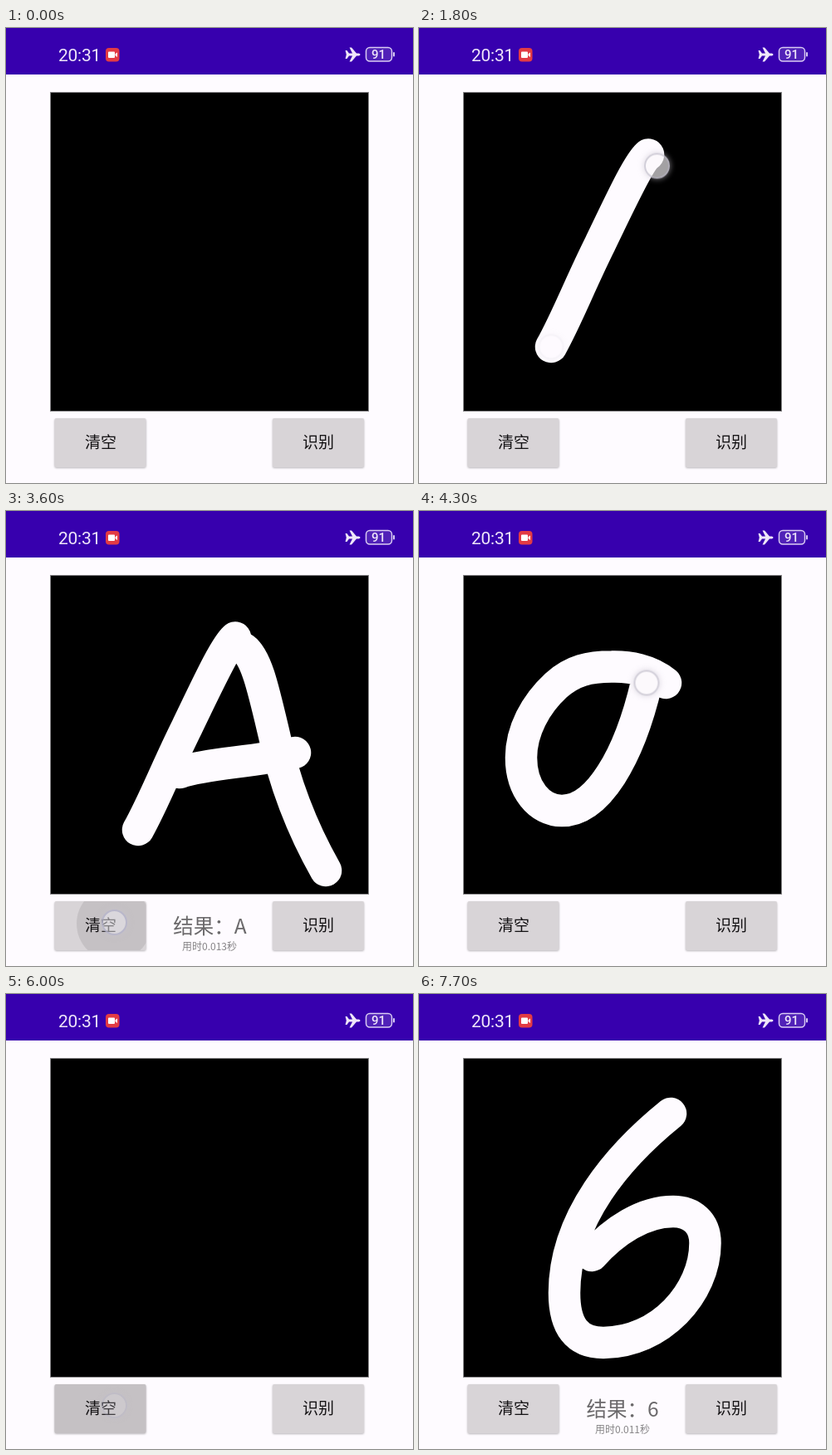
An HTML page that plays this animation: 490 px wide and 548 px high, repeating every 8000 ms.

```html
<!DOCTYPE html>
<html lang="zh">
<head>
<meta charset="utf-8">
<title>手写识别</title>
<style>
html, body { margin: 0; width: 100%; height: 100%; overflow: hidden; background: #fefbff; }
svg { position: absolute; left: 0; top: 0; }
text { font-family: "Noto Sans CJK SC", "Noto Sans CJK", "Noto Sans CJK JP", sans-serif; text-anchor: middle; }
.status { font-family: Roboto, sans-serif; fill: #efe6f9; }

/* everything advances in 100 ms ticks: 1.25% of the loop */
.ink, .pen, .tap, .ripple, .result { animation: var(--k) 8s step-end infinite; opacity: 0; }

/* pen paths, shared by the ink and the touch marker */
.p1 { --p: path("M276 152.5C265 160.5 242 210 218 260C194 308 178 350 159 384"); }
.p2 { --p: path("M286.5 166C301.5 177 309.5 213 322.5 268C334.5 325 355 380 385 433"); }
.p3 { --p: path("M209 315C240 304 295 303 348 291"); }
.p4 { --p: path("M297 207C278 191 252 187 232 187.5C205 187.5 185 192 165 210C140 233 123 265 123 297C123 335 145 361 172 361C215 361 253 297 274 207"); }
.p5 { --p: path("M270 208C262 245 260 280 259.500 315C259.500 355 266 374.500 287 374.500C308 374.500 335 358 364 343"); }
.p6 { --p: path("M303 144C240 195 175 270 175 360C175 400 190 420 222 420C290 420 344.500 360 344.500 300C344.500 275 328 262 306 262C270 262 235 285 208 315"); }

.ink {
  d: var(--p); fill: none; stroke: #fefbff; stroke-width: 38.5;
  stroke-linecap: round; stroke-linejoin: round;
  stroke-dasharray: 100 200; stroke-dashoffset: 100;
}
.pen, .tap {
  position: absolute; left: 0; top: 0; width: 31px; height: 31px;
  box-sizing: border-box; border-radius: 50%;
  background: rgba(250, 247, 251, .65);
  border: 2px solid rgba(182, 179, 194, .62);
  box-shadow: 0 0 6px 1px rgba(200, 196, 206, .5);
}
.pen { offset-path: var(--p); offset-rotate: 0deg; }
.tap { background: rgba(240, 238, 244, .5); border-color: rgba(170, 170, 196, .7); }
.ripple { fill: #000; fill-opacity: .085; transform-box: fill-box; transform-origin: center; }
.btn { fill: #d8d4d7; filter: drop-shadow(0 1px 1.2px rgba(0, 0, 0, .28)); }

@keyframes ink1 {
  6.25% { opacity: 1; stroke-dashoffset: 100; animation-timing-function: steps(6); }
  13.75% { opacity: 1; stroke-dashoffset: 0; }
  46.25% { opacity: 0; }
}
@keyframes ink2 {
  22.5% { opacity: 1; stroke-dashoffset: 100; animation-timing-function: steps(4); }
  27.5% { opacity: 1; stroke-dashoffset: 0; }
  46.25% { opacity: 0; }
}
@keyframes ink3 {
  28.75% { opacity: 1; stroke-dashoffset: 100; animation-timing-function: steps(2); }
  31.25% { opacity: 1; stroke-dashoffset: 0; }
  46.25% { opacity: 0; }
}
@keyframes ink4 {
  47.5% { opacity: 1; stroke-dashoffset: 100; animation-timing-function: steps(5); }
  53.75% { opacity: 1; stroke-dashoffset: 0; }
  75% { opacity: 0; }
}
@keyframes ink5 {
  55% { opacity: 1; stroke-dashoffset: 100; animation-timing-function: steps(3); }
  58.75% { opacity: 1; stroke-dashoffset: 0; }
  75% { opacity: 0; }
}
@keyframes ink6 {
  76.25% { opacity: 1; stroke-dashoffset: 100; animation-timing-function: steps(5); }
  82.5% { opacity: 1; stroke-dashoffset: 48.5; animation-timing-function: steps(5); }
  88.75% { opacity: 1; stroke-dashoffset: 0; }
}

@keyframes pen1 {
  6.25% { opacity: 1; offset-distance: 0%; animation-timing-function: steps(6); }
  13.75% { opacity: 1; offset-distance: 100%; }
  15% { opacity: .18; }
  28.75% { opacity: 0; }
}
@keyframes pen2 {
  21.25% { opacity: 1; offset-distance: 0%; }
  22.5% { opacity: 1; offset-distance: 0%; animation-timing-function: steps(4); }
  27.5% { opacity: 1; offset-distance: 100%; }
  28.75% { opacity: 0; }
}
@keyframes pen3 {
  28.75% { opacity: 1; offset-distance: 0%; animation-timing-function: steps(2); }
  31.25% { opacity: 1; offset-distance: 100%; }
  32.5% { opacity: 0; }
}
@keyframes pen4 {
  47.5% { opacity: 1; offset-distance: 0%; animation-timing-function: steps(5); }
  53.75% { opacity: 1; offset-distance: 100%; }
  55% { opacity: 0; }
}
@keyframes pen5 {
  55% { opacity: 1; offset-distance: 0%; animation-timing-function: steps(3); }
  58.75% { opacity: 1; offset-distance: 100%; }
  60% { opacity: 0; }
}
@keyframes pen6 {
  76.25% { opacity: 1; offset-distance: 0%; animation-timing-function: steps(5); }
  82.5% { opacity: 1; offset-distance: 58.5%; animation-timing-function: steps(5); }
  88.75% { opacity: 1; offset-distance: 100%; }
  90% { opacity: 0; }
}

@keyframes tapClear {
  45%, 73.75% { opacity: 1; }
  46.25%, 75% { opacity: .4; }
  47.5%, 76.25% { opacity: 0; }
}
@keyframes tapRead {
  35%, 65%, 92.5% { opacity: 1; }
  37.5%, 67.5%, 95% { opacity: .4; }
  38.75%, 68.75%, 96.25% { opacity: 0; }
}
@keyframes rippleClear {
  45%, 73.75% { opacity: 1; transform: scale(.375); }
  46.25%, 75% { opacity: 1; transform: scale(1); }
  47.5%, 76.25% { opacity: .5; }
  48.75%, 77.5% { opacity: 0; }
}
@keyframes rippleRead {
  35%, 65%, 92.5% { opacity: 1; transform: scale(.375); }
  36.25%, 66.25%, 93.75% { opacity: 1; transform: scale(1); }
  37.5%, 68.75%, 95% { opacity: .6; }
  70% { opacity: .3; }
  38.75%, 71.25%, 96.25% { opacity: 0; }
}

@keyframes resultUpper { 37.5% { opacity: 1; } 46.25% { opacity: 0; } }
@keyframes resultLower { 67.5% { opacity: 1; } 75% { opacity: 0; } }
@keyframes resultDigit { 95% { opacity: 1; } }
</style>
</head>
<body>
<svg width="490" height="548" viewBox="0 0 490 548">
  <defs>
    <clipPath id="board"><rect x="54" y="78" width="382" height="383"/></clipPath>
    <clipPath id="left"><rect x="58.500" y="470" width="110" height="59" rx="2"/></clipPath>
    <clipPath id="right"><rect x="321" y="470" width="110" height="59" rx="2"/></clipPath>
  </defs>

  <!-- status bar -->
  <rect width="490" height="56" fill="#3700ae"/>
  <text class="status" x="88.500" y="39.500" font-size="21" letter-spacing="-.3">20:31</text>
  <rect x="120" y="24" width="16.500" height="16.500" rx="4" fill="#e23b44"/>
  <path d="M124 28.500h6q1 0 1 1v5.500q0 1-1 1h-6q-1 0-1-1v-5.500q0-1 1-1zM131.500 31.200l2.500-1.700v5.500l-2.500-1.700z" fill="#fff"/>
  <path d="M408.500 27h2l2.500 3.500h4l-3.500-7h2.500l6 7h2.500q2 .3 2 1.500t-2 1.500h-2.500l-6 7h-2.500l3.500-7h-4l-2.500 3.500h-2l1.300-5z" fill="#efe6f9"/>
  <rect x="433.500" y="23.500" width="31" height="16.500" rx="4.500" fill="#fff" fill-opacity=".13" stroke="#d9cbf3" stroke-width="1.500"/>
  <rect x="466" y="29" width="2" height="5.500" rx="1" fill="#d9cbf3"/>
  <text class="status" x="448.500" y="37" font-size="15" font-weight="500">91</text>

  <!-- drawing board -->
  <rect x="53.500" y="77.500" width="383" height="384" stroke="#8a888b"/>
  <g clip-path="url(#board)">
    <path class="ink p1" pathLength="100" style="--k:ink1"/>
    <path class="ink p2" pathLength="100" style="--k:ink2"/>
    <path class="ink p3" pathLength="100" style="--k:ink3"/>
    <path class="ink p4" pathLength="100" style="--k:ink4"/>
    <path class="ink p5" pathLength="100" style="--k:ink5"/>
    <path class="ink p6" pathLength="100" style="--k:ink6"/>
  </g>

  <!-- buttons -->
  <rect class="btn" x="58.500" y="470" width="110" height="59" rx="2"/>
  <rect class="btn" x="321" y="470" width="110" height="59" rx="2"/>
  <g clip-path="url(#left)"><circle class="ripple" cx="130" cy="497" r="120" style="--k:rippleClear"/></g>
  <g clip-path="url(#right)"><circle class="ripple" cx="376" cy="500" r="120" style="--k:rippleRead"/></g>
  <g font-size="19" font-weight="500" fill="#141214">
    <text x="114" y="506">清空</text>
    <text x="376" y="506">识别</text>
  </g>

  <!-- results -->
  <g font-size="24.500" fill="#6b696b">
    <g class="result" style="--k:resultUpper">
      <text x="245.500" y="508.500">结果：A</text>
      <text x="245" y="528.800" font-size="12" fill="#858385">用时0.013秒</text>
    </g>
    <g class="result" style="--k:resultLower">
      <text x="245" y="508.500">结果：a</text>
      <text x="245" y="528.800" font-size="12" fill="#858385">用时0.003秒</text>
    </g>
    <g class="result" style="--k:resultDigit">
      <text x="245" y="508.500">结果：6</text>
      <text x="245" y="528.800" font-size="12" fill="#858385">用时0.011秒</text>
    </g>
  </g>
</svg>

<!-- touch markers -->
<div class="pen p1" style="--k:pen1"></div>
<div class="pen p2" style="--k:pen2"></div>
<div class="pen p3" style="--k:pen3"></div>
<div class="pen p4" style="--k:pen4"></div>
<div class="pen p5" style="--k:pen5"></div>
<div class="pen p6" style="--k:pen6"></div>
<div class="tap" style="--k:tapClear; left:114.5px; top:479.5px"></div>
<div class="tap" style="--k:tapRead; left:360.5px; top:484.5px"></div>
</body>
</html>
```
